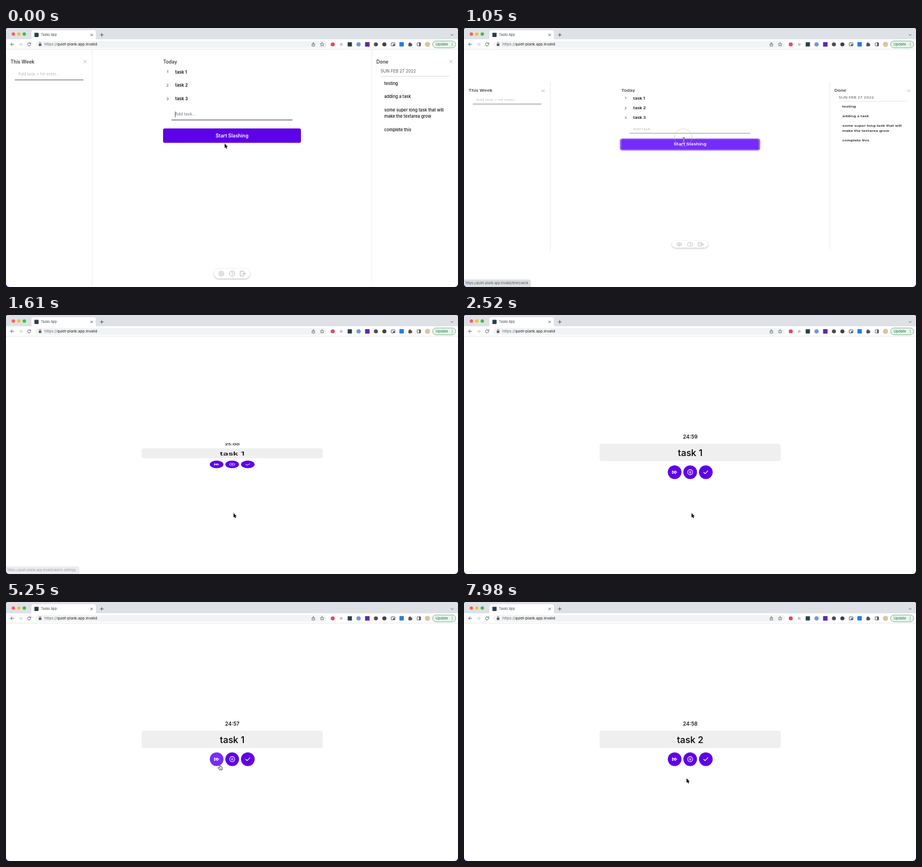
Write an HTML page with a canvas that moves like this. It is 800 px wide and 459 px high and loops after 8000 ms.

```html
<!DOCTYPE html>
<html lang="en">
<head>
<meta charset="utf-8">
<title>Tasks App</title>
<style>
html, body { margin: 0; width: 100%; height: 100%; overflow: hidden; background: #fff; }
canvas { display: block; width: 800px; height: 459px; }
</style>
</head>
<body>
<canvas id="stage"></canvas>
<script>
const W = 800, H = 459, LOOP = 8000, MID = 247;
const PURPLE = [94, 0, 232], LIGHT = [118, 44, 255];
const SITE = 'quiet-plank.app.invalid';
const canvas = document.getElementById('stage');
const dpr = window.devicePixelRatio || 1;
canvas.width = W * dpr;
canvas.height = H * dpr;
const c = canvas.getContext('2d');

// time, x, y of the pointer tip
const PATH = [
  [0, 387, 205], [70, 387, 205], [420, 390, 194], [760, 390, 194], [840, 388, 194],
  [1050, 389, 199], [1190, 394, 292], [1330, 402, 340], [1470, 402.8, 351.2],
  [3960, 402.8, 351.2], [4690, 378.5, 288], [5450, 378.5, 288], [5810, 393, 333],
  [7860, 393, 333], [7980, 394, 312.7]
];

const clamp = (v) => Math.max(0, Math.min(1, v));
const ramp = (t, a, b) => clamp((t - a) / (b - a));
const smooth = (p) => p * p * (3 - 2 * p);

// cubic-bezier(.42, 0, .58, 1)
function easeInOut(x) {
  let lo = 0, hi = 1;
  for (let i = 0; i < 20; i++) {
    const u = (lo + hi) / 2, v = 1 - u;
    if (3 * u * v * v * 0.42 + 3 * u * u * v * 0.58 + u * u * u < x) lo = u; else hi = u;
  }
  return smooth(lo);
}

function pointer(t) {
  let i = 0;
  while (i < PATH.length - 2 && PATH[i + 1][0] <= t) i++;
  const a = PATH[i], b = PATH[i + 1], p = smooth(ramp(t, a[0], b[0]));
  return [a[1] + (b[1] - a[1]) * p, a[2] + (b[2] - a[2]) * p];
}

const purple = (p) => `rgb(${PURPLE.map((v, i) => Math.round(v + (LIGHT[i] - v) * p)).join(',')})`;

function box(x, y, w, h, r, fill, stroke, width = 1) {
  c.beginPath();
  c.roundRect(x, y, w, h, r);
  if (fill) { c.fillStyle = fill; c.fill(); }
  if (stroke) { c.strokeStyle = stroke; c.lineWidth = width; c.stroke(); }
}

function dot(x, y, r, fill, stroke, width = 1) {
  box(x - r, y - r, 2 * r, 2 * r, r, fill, stroke, width);
}

function text(s, x, y, size, color, weight = 400, align = 'left') {
  c.font = `${weight} ${size}px Inter, "Open Sans", sans-serif`;
  c.textAlign = align;
  c.fillStyle = color;
  c.fillText(s, x, y);
}

// strokes an SVG path placed at x, y
function line(d, x, y, color, width = 1, fill) {
  c.save();
  c.translate(x, y);
  const p = new Path2D(d);
  if (fill) { c.fillStyle = fill; c.fill(p); }
  c.strokeStyle = color;
  c.lineWidth = width;
  c.lineCap = c.lineJoin = 'round';
  c.stroke(p);
  c.restore();
}

const cross = (x, y, r, color, w) => line(`M${-r} ${-r}L${r} ${r}M${r} ${-r}L${-r} ${r}`, x, y, color, w);

function drawBrowser() {
  box(0, 0, W, 20, 0, '#dee1e6');
  box(45, 4, 114, 18, [4, 4, 0, 0], '#fff');
  [['#ff5f57', 13], ['#febc2e', 22.7], ['#28c840', 32.4]].forEach(([col, x]) => dot(x, 10.8, 3, col));
  box(50.3, 8.5, 7.4, 7.4, 0.8, '#24424d');
  text('Tasks App', 62, 14.2, 5.7, '#3c4043');
  cross(151.6, 12.2, 1.7, '#45484c', 0.9);
  line('M-2.8 0H2.8M0 -2.8V2.8', 169.5, 12.2, '#45484c', 0.9);
  line('M-1.8 -.8L0 1L1.8 -.8', 789.6, 12.4, '#45484c', 0.9);

  box(0, 20, W, 17.5, 0, '#fff');
  box(0, 37, W, 0.8, 0, '#dfe1e4');
  line('M2.8 0H-2.8M0 -2.8L-2.8 0L0 2.8', 11, 29, '#4d5054', 0.9);
  line('M-2.8 0H2.8M0 -2.8L2.8 0L0 2.8', 26, 29, '#b9bbbe', 0.9);
  line('M2.4 -1.5A2.8 2.8 0 1 0 2.8 .5M2.8 -3V-1.1H.9', 41, 29, '#4d5054', 0.9);
  box(52, 23, 516, 12, 6, '#f1f3f4');
  box(58, 28, 4.6, 3.8, 0.6, '#55585c');
  line('M-1.3 0V-1.2A1.3 1.3 0 0 1 1.3 -1.2V0', 60.3, 28, '#55585c', 0.8);
  text('https://', 68, 31.3, 6.6, '#686c71');
  const start = 68 + c.measureText('https://').width;
  text(SITE, start, 31.3, 6.6, '#202124');
  line('M-1 -1H-2.3V3H2.3V-1H1M0 1.2V-3M-1.4 -1.7L0 -3.1L1.4 -1.7', 544, 29, '#5f6368', 0.8);
  line('M0 -3.3L1 -1.1L3.3 -.9L1.6 .7L2.1 3L0 1.8L-2.1 3L-1.6 .7L-3.3 -.9L-1 -1.1Z', 559.5, 29, '#5f6368', 0.8);

  dot(578.3, 29, 3.6, '#e5475c');
  dot(593.3, 29, 2.6, '#c3c9d2');
  box(604.7, 25.2, 7.6, 7.6, 0.6, '#24424d');
  dot(624, 29, 3.8, '#6b9be0');
  box(635.5, 25, 8, 8, 0.8, '#5a2bb4');
  dot(654.7, 29, 3.6, '#4b4e53');
  dot(669.7, 29, 3.6, '#3f4145');
  box(681.8, 26.3, 6.6, 5.4, 0.7, null, '#3c4043', 0.9);
  box(685, 28.7, 2.7, 2.2, 0, '#3c4043');
  box(696.3, 25, 7.8, 7.8, 1, '#217fe0');
  box(712.3, 27, 5.6, 5.4, 0.7, '#4d5054');
  dot(715, 26.7, 1.3, '#4d5054');
  dot(718, 29.7, 1.3, '#4d5054');
  box(727.7, 26.1, 6, 5.8, 0.5, null, '#4d5054', 0.9);
  box(731.2, 26, 2.8, 6, 0, '#4d5054');
  dot(746, 29, 4.6, '#d9c3a5');
  box(755, 23, 41, 12, 6, '#e9f5ec', '#5aa273', 0.8);
  text('Update', 760.3, 31.3, 6.4, '#2d8550', 500);
  [26.6, 29, 31.4].forEach((y) => dot(789.8, y, 0.65, '#2d8550'));
}

function drawNav() {
  c.save();
  c.shadowColor = 'rgba(0,0,0,.28)';
  c.shadowBlur = 3 * dpr;
  c.shadowOffsetY = dpr;
  box(368, 426.5, 64, 17.5, 8.7, '#fff');
  c.restore();
  const grey = '#acacb0';
  let gear = '';
  for (let i = 0; i <= 16; i++) {
    const a = i * Math.PI / 8, r = i % 2 ? 3.9 : 4.6;
    gear += (i ? 'L' : 'M') + (r * Math.cos(a)).toFixed(2) + ' ' + (r * Math.sin(a)).toFixed(2);
  }
  line(gear, 381, 435.3, grey, 0.9);
  dot(381, 435.3, 1.8, null, grey, 0.9);
  dot(400.2, 435.3, 4.6, null, grey, 0.9);
  line('M0 -2.6V0L1.8 1.2', 400.2, 435.3, grey, 0.9);
  line('M1.5 -2V-4.3H-4.5V4.3H1.5V2M-1.5 0H4.8M3 -1.8L4.9 0L3 1.8', 419, 435.3, grey, 0.9);
}

function drawBoard(t) {
  const pressed = t >= 800, ink = '#111', head = '#45454a';
  box(152, 38, 0.8, 419, 0, '#e3e3e6');
  box(647, 38, 0.8, 410, 0, '#e3e3e6');
  text('This Week', 8, 62.5, 8.4, head, 600);
  text('Today', 278.2, 62.5, 8.3, head, 600);
  text('Done', 655.5, 62.5, 8.4, head, 600);
  cross(140, 59.6, 2.6, '#b0b0b4', 0.9);
  cross(787.3, 59.6, 2.6, '#b0b0b4', 0.9);

  text('Add task + hit enter...', 21.4, 84.3, 7.3, '#bcbcc0');
  box(15.5, 91.6, 121.5, 1, 0, '#505055');

  [1, 2, 3].forEach((n, i) => {
    const y = 80.7 + i * 23.75;
    text(String(n), 286, y - 0.3, 6.4, '#55555a', 500, 'center');
    text('task ' + n, 299.5, y, 7.6, ink, 600);
  });
  text('Add task...', 299, 155.2, 7.3, pressed ? '#b9b9bd' : '#737378');
  if (t < 350) box(299, 148, 0.7, 10.5, 0, '#222');
  box(293, 162.6, 214, 1, 0, pressed ? '#77777c' : '#303035');

  if (pressed) box(276.7, 176.7, 246.6, 27.8, 4, '#fff', '#5c12d6', 1.2);
  box(278, 178, 244, 25.4, 3, purple(ramp(t, 180, 380)));
  text('Start Slashing', 400, 193.7, 8.6, '#fff', 600, 'center');

  text('SUN FEB 27 2022', 663, 78.6, 7.4, '#55555a');
  box(663, 85, 121.5, 0.8, 0, '#cfcfd4');
  [['testing', 100.6], ['adding a task', 124.4], ['some super long task that will', 148.1],
    ['make the textarea grow', 159.4], ['complete this', 183.1]
  ].forEach(([s, y]) => text(s, 669.5, y, 7.4, ink, 500));
  drawNav();
}

function clock(t) {
  const ticks = t < 5460 ? [2520, 3570, 4620] : [6510, 7560];
  const left = 1500 - ticks.filter((k) => t >= k).length;
  return Math.floor(left / 60) + ':' + String(left % 60).padStart(2, '0');
}

function drawTimer(t) {
  text(clock(t), 400.4, 219.3, 9.3, '#000', 500, 'center');
  box(240, 228, 320.6, 31, 4.5, '#efefef');
  text(t < 5460 ? 'task 1' : 'task 2', 400.4, 250, 16.2, '#000', 500, 'center');
  const hover = ramp(t, 4540, 4660) * (1 - ramp(t, 5500, 5620));
  [372.8, 400.3, 428].forEach((x, i) => dot(x, 278.6, 12.1, purple(i ? 0 : hover)));
  line('M-3.9 -2.5L-.3 0L-3.9 2.5ZM.5 -2.5L4.1 0L.5 2.5Z', 372.8, 278.6, '#fff', 1.1);
  dot(400.3, 278.6, 4.5, null, '#fff', 1.1);
  line('M-1.1 -1.6V1.6M1.1 -1.6V1.6', 400.3, 278.6, '#fff', 1.1);
  line('M-3.7 .2L-1.2 2.6L3.7 -2.4', 428, 278.6, '#fff', 1.2);
}

function drawPage(t) {
  const out = t < 1355;
  const scale = out ? 1 - easeInOut(ramp(t, 877, 1355)) : easeInOut(ramp(t, 1355, 1833));
  c.save();
  c.beginPath();
  c.rect(0, 38, W, H - 38);
  c.clip();
  c.translate(0, MID * (1 - scale));
  c.scale(1, Math.max(scale, 0.001));
  (out ? drawBoard : drawTimer)(t);
  c.restore();
}

function drawStatus(t) {
  const alpha = ramp(t, 340, 450) * (1 - ramp(t, 1400, 1850));
  if (!alpha) return;
  const late = t >= 1190;
  c.globalAlpha = alpha;
  box(-1, 446, late ? 130.5 : 119, 14, [0, 4, 0, 0], '#dcdee2', '#d0d2d6', 0.5);
  text('https://' + SITE + (late ? '/alarm-settings' : '/timer/work'), 2.4, 453.6, 5.7, '#54575c');
  c.globalAlpha = 1;
}

function drawRipple(t, begin, x, y) {
  const p = ramp(t, begin, begin + 310);
  if (p <= 0 || p >= 1) return;
  dot(x, y, 4 + 15 * p, null, `rgba(185,185,190,${1.2 * (1 - p) + 0.3})`, 0.9);
}

function drawPointer(t) {
  const [x, y] = pointer(t);
  const hand = (t > 180 && t < 900) || (t > 4540 && t < 5500);
  if (hand) {
    line('M-.9 .2C-.9 -1 .8 -1 .8 .2V3L3.6 3.5Q4.8 3.8 4.6 5.2L4 8.8H-.6L-3.3 5.4C-3.6 4.2 -2.3 3.9 -.9 5.4Z',
      x, y + 0.8, '#222', 0.8, '#fff');
    line('M.6 6V7.6M2.4 6V7.6', x, y + 0.8, '#222', 0.6);
  } else if (t >= 900 && t < 1110) {
    const beam = 'M-1.8 -4.8Q0 -4.8 0 -3.6V3.6Q0 4.8 -1.8 4.8M1.8 -4.8Q0 -4.8 0 -3.6M0 3.6Q0 4.8 1.8 4.8';
    line(beam, x, y, '#fff', 1.9);
    line(beam, x, y, '#222', 0.9);
  } else {
    const arrow = 'M0 0V7.6L1.7 6.1L2.9 8.9L4.2 8.3L3 5.6H5.3Z';
    line(arrow, x, y, '#fff', 1);
    line(arrow, x, y, '#000', 0.15, '#000');
  }
}

function draw(t) {
  c.setTransform(dpr, 0, 0, dpr, 0, 0);
  box(0, 0, W, H, 0, '#14104a');
  c.save();
  c.beginPath();
  c.roundRect(0, 0, W, H, [4, 4, 6, 6]);
  c.clip();
  box(0, 0, W, H, 0, '#fff');
  drawPage(t);
  drawBrowser();
  drawStatus(t);
  c.restore();
  drawRipple(t, 810, 388, 194);
  drawRipple(t, 5270, 378.5, 288);
  drawPointer(t);
}

const begin = performance.now();
function frame() {
  draw((performance.now() - begin) % LOOP);
  requestAnimationFrame(frame);
}
frame();
</script>
</body>
</html>
```
